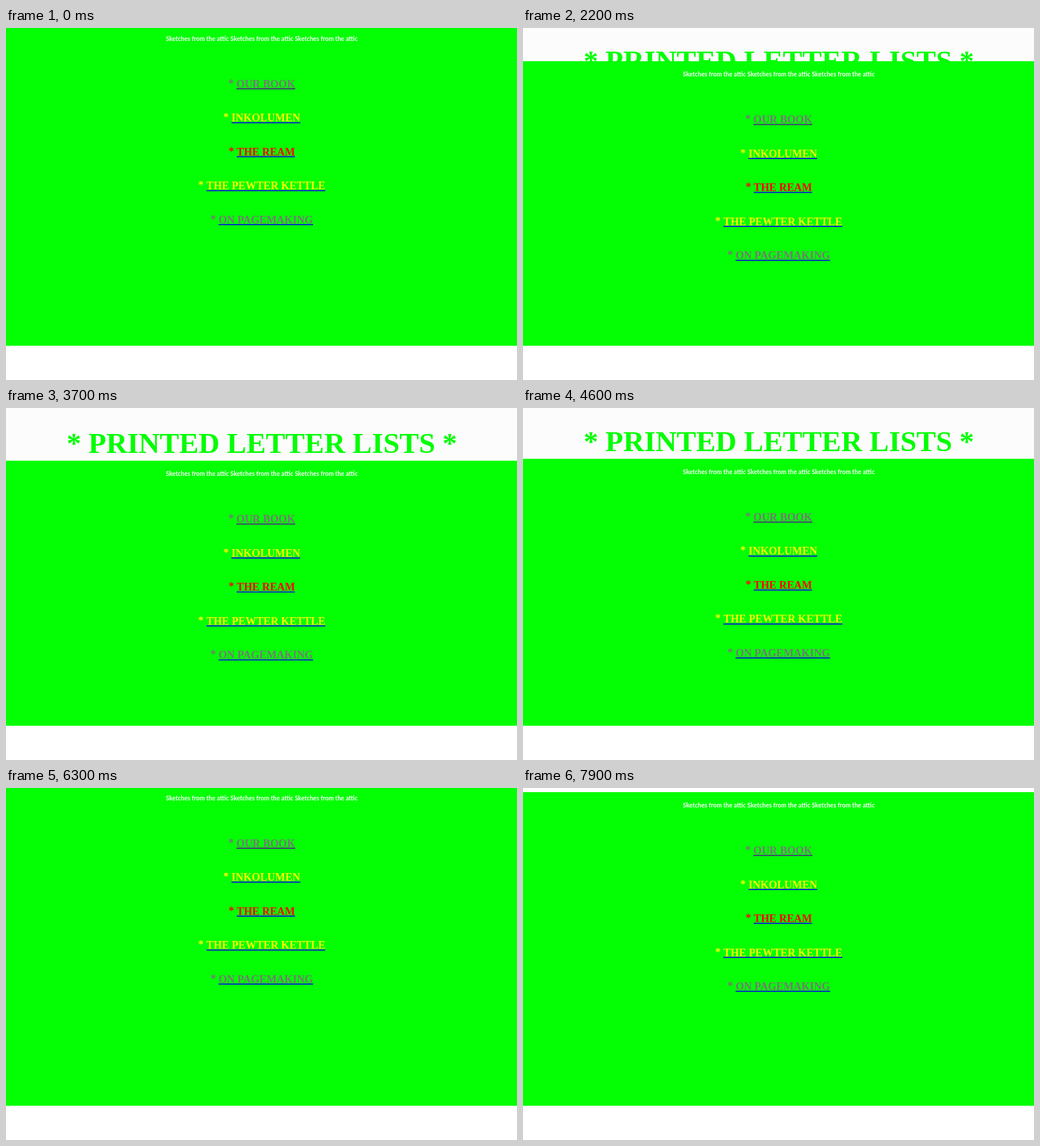
Animation of 864x596 px, one loop 8000 ms. Source, as an HTML page with a canvas:

```html
<!DOCTYPE html>
<html lang="en">
<head>
<meta charset="utf-8">
<title>Printed letter lists</title>
<style>
  html, body { margin: 0; width: 100%; height: 100%; overflow: hidden; background: #fff; }
  canvas { display: block; }
</style>
</head>
<body>
<canvas id="stage" width="864" height="596"></canvas>
<script>
const ctx = document.getElementById('stage').getContext('2d');
const W = 864, H = 596, MID = 432.5, FLOOR = 538;
const LOOP = 8000, STEP = 100;
const SHUT = 9, OPEN = 85;
const GREEN = '#04fe04', BLUE = '#0000ee', PURPLE = '#551a8b', GREY = '#777777';
const SERIF = '"Liberation Serif", serif';

const TITLE = '* PRINTED LETTER LISTS *';
const TAGLINE = Array(3).fill('Sketches from the attic').join(' ');
const LINKS = [
  ['OUR BOOK', GREY, PURPLE],
  ['INKOLUMEN', '#ffff00', BLUE],
  ['THE REAM', '#ff0000', BLUE],
  ['THE PEWTER KETTLE', '#ffff00', BLUE],
  ['ON PAGEMAKING', GREY, BLUE],
];

const bez = (a, b, s) =>
  3 * a * s * (1 - s) ** 2 + 3 * b * s * s * (1 - s) + s ** 3;

// CSS-style cubic-bezier easing, solved by bisection.
function cubicBezier(x1, y1, x2, y2) {
  return x => {
    if (x <= 0) return 0;
    if (x >= 1) return 1;
    let lo = 0, hi = 1;
    for (let i = 0; i < 30; i++) {
      const mid = (lo + hi) / 2;
      if (bez(x1, x2, mid) < x) lo = mid; else hi = mid;
    }
    return bez(y1, y2, lo);
  };
}

const opening = { start: 1950, time: 3000, ease: cubicBezier(0.2, 1.35, 0, 1.1) };
const closing = { start: 5250, time: 3600, ease: cubicBezier(0.41, 1.85, 0.07, 1) };
const CARRY = 6600; // the loop begins with the panel still closing

const progress = (move, t) => move.ease((t - move.start) / move.time);

function panelTop(t) {
  if (t >= opening.start && t < closing.start)
    return SHUT + (OPEN - SHUT) * progress(opening, t);
  const held = t < opening.start ? CARRY + Math.max(0, t - STEP) : t;
  return OPEN + (SHUT - OPEN) * progress(closing, held);
}

function centred(text, y, font, color) {
  ctx.font = font;
  ctx.fillStyle = color;
  ctx.textAlign = 'center';
  ctx.fillText(text, MID, y);
}

function link([label, color, line], y) {
  ctx.font = 'bold 18.2px ' + SERIF;
  ctx.textAlign = 'left';
  const lead = ctx.measureText('* ').width;
  const width = ctx.measureText(label).width;
  const x = MID - (lead + width) / 2;
  ctx.fillStyle = line;
  ctx.fillRect(x + lead, y + 1.4, width, 1.7);
  ctx.fillStyle = color;
  ctx.fillText('*', x, y - 1);
  ctx.fillText(label, x + lead, y);
}

function draw(t) {
  const top = panelTop(t);
  ctx.fillStyle = '#ffffff';
  ctx.fillRect(0, 0, W, H);
  if (top > SHUT + 3) {
    ctx.fillStyle = '#fcfcfc';
    ctx.fillRect(0, 0, W, top);
  }
  centred(TITLE, 72 + Math.max(0, top - OPEN), 'bold 49.3px ' + SERIF, GREEN);

  ctx.fillStyle = GREEN;
  ctx.fillRect(0, top, W, FLOOR - top);
  centred(TAGLINE, top + 26, 'bold 10.4px Lato, sans-serif', '#ffffff');
  LINKS.forEach((item, i) => link(item, top + 105 + i * 57.5));
}

function tick() {
  const t = performance.now() % LOOP;
  draw(Math.floor(t / STEP) * STEP);
  requestAnimationFrame(tick);
}
tick();
</script>
</body>
</html>
```
